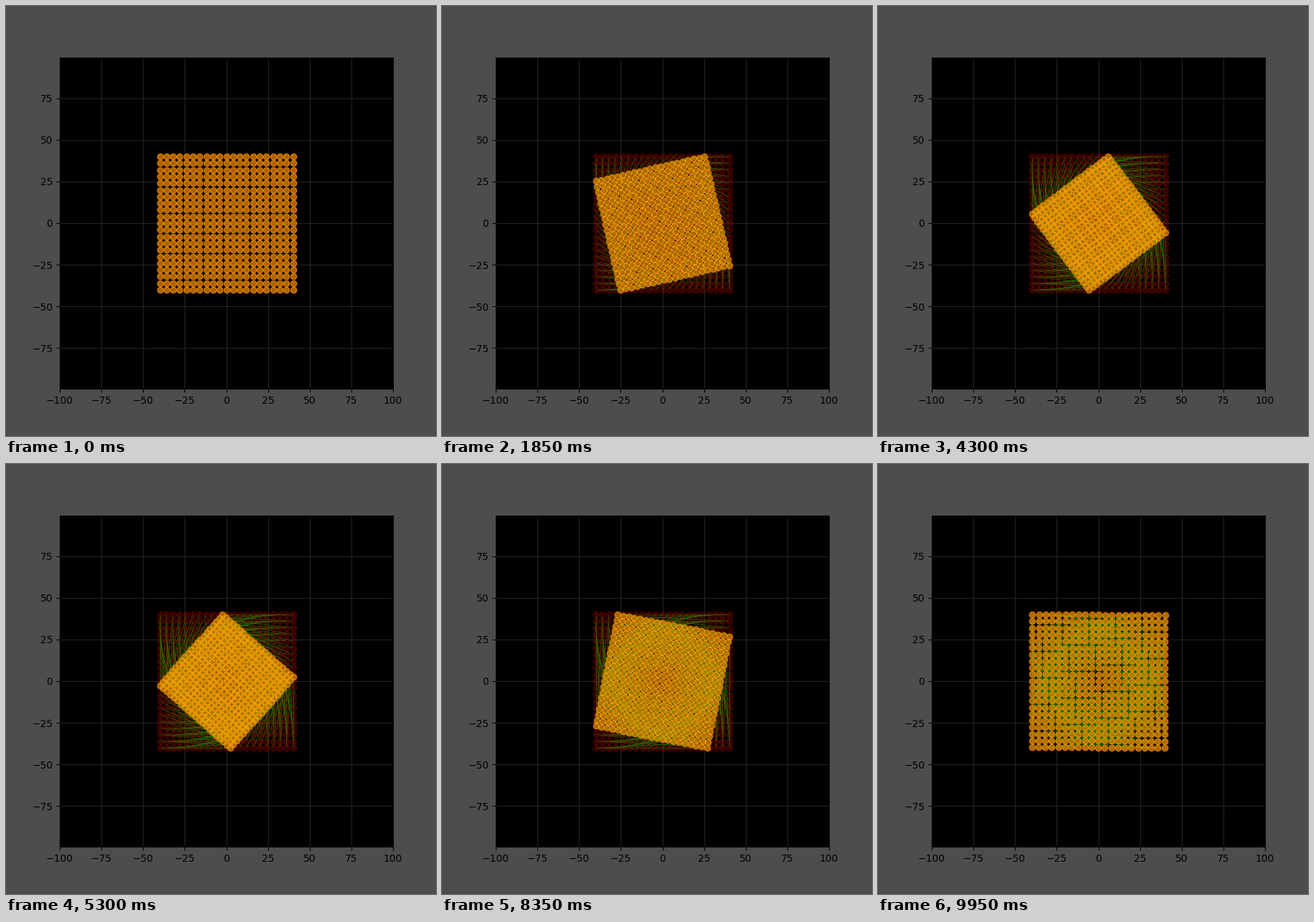
Write a matplotlib script that moves like this. It is 600x600 px and loops after 10 s.

```python
import numpy as np
import matplotlib.pyplot as plt
from matplotlib.animation import FuncAnimation
from matplotlib.collections import LineCollection

FRAMES = 200
INTERVAL = 50
LIMIT = 100

# Square lattice and its image under a quarter turn
axis = np.linspace(-40, 40, 21)
gx, gy = np.meshgrid(axis, axis, indexing="ij")
start = np.column_stack([gx.ravel(), gy.ravel()])
quarter_turn = np.array([[0, -1], [1, 0]])
end = start @ quarter_turn.T

# Keeps dots that fall on a pixel boundary from flickering sideways
NUDGE = np.array([1e-6, 0])

fig = plt.figure(figsize=(6, 6), dpi=100, facecolor="0.3")
ax = fig.add_axes([0.125, 0.11, 0.775, 0.77], facecolor="black")
ax.set_xlim(-LIMIT, LIMIT)
# Same scale on both axes
ax.set_ylim(-LIMIT * 0.77 / 0.775, LIMIT * 0.77 / 0.775)
ax.grid(alpha=0.2)
ax.set_axisbelow(True)

trails = LineCollection([], colors="green", linewidths=0.5, zorder=1)
ax.add_collection(trails, autolim=False)


def add_dots(color, alpha, zorder):
    x, y = (start + NUDGE).T
    return ax.scatter(x, y, color=color, alpha=alpha, zorder=zorder)


add_dots("red", 0.2, 2)
movers = add_dots("orange", 0.6, 3)


def update(frame):
    t = frame / FRAMES
    now = (1 - t) * start + t * end
    movers.set_offsets(now + NUDGE)
    trails.set_segments(np.stack([start, now], axis=1) if frame else [])
    return trails, movers


anim = FuncAnimation(fig, update, frames=FRAMES, interval=INTERVAL,
                     repeat=True, repeat_delay=0)
plt.show()
```
